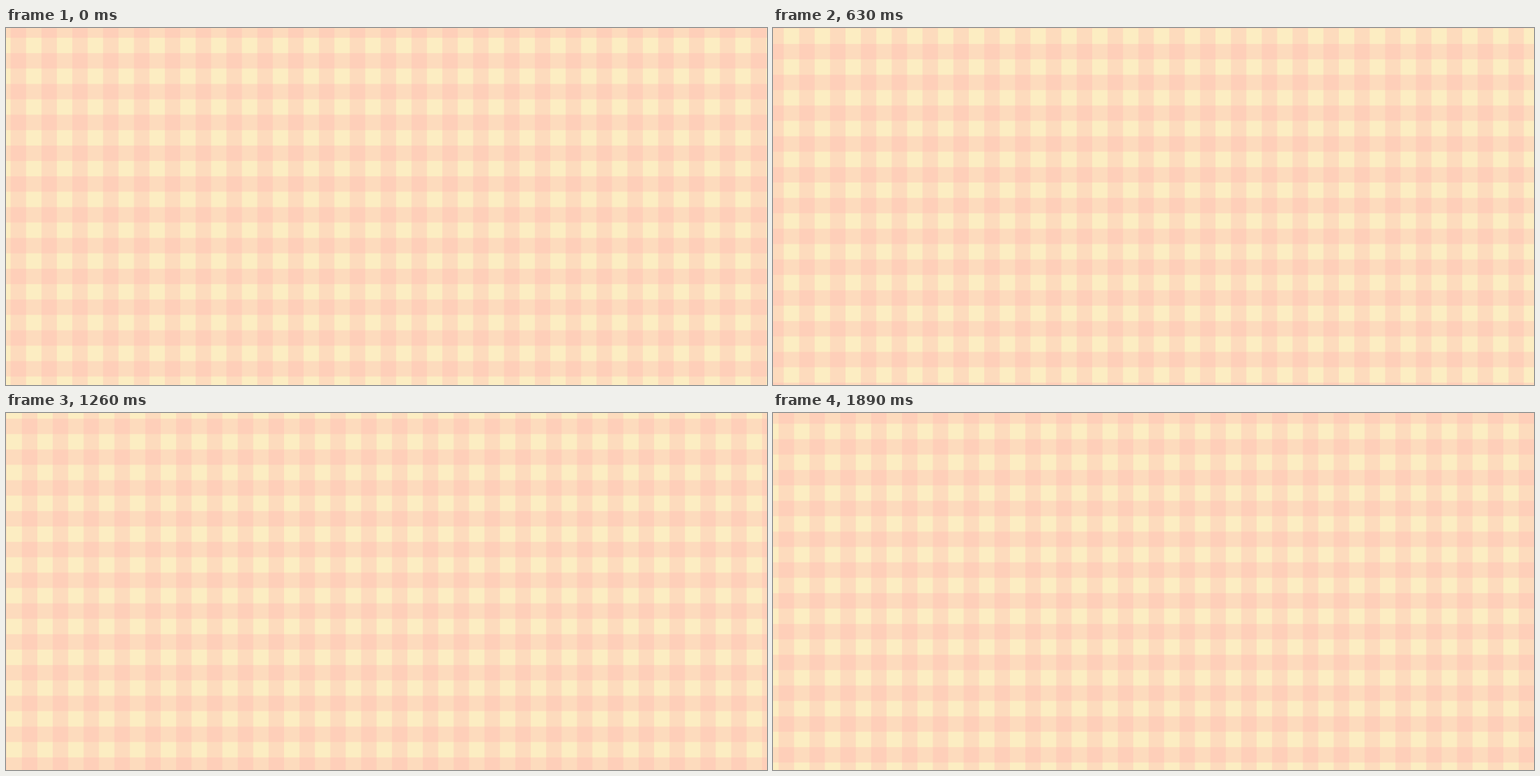
Animation, 1092 px wide and 513 px high, one loop 1.96 s. Source, as an HTML page with a canvas:

```html
<!DOCTYPE html>
<html lang="en">
<head>
<meta charset="utf-8">
<title>Gingham drift</title>
<style>
  html, body { margin: 0; width: 100%; height: 100%; overflow: hidden; background: #fcedc2; }
  canvas { display: block; }
</style>
</head>
<body>
<canvas width="1092" height="513"></canvas>
<script>
const canvas = document.querySelector('canvas');
const ctx = canvas.getContext('2d');
const W = canvas.width, H = canvas.height;
const UNIT = 1.475;        // one scroll step, in pixels
const STRIPE = 15 * UNIT;
const PERIOD = 2 * STRIPE;
const TICK = 70, TICKS = 28;

// Scroll steps done by tick k: one stall, then two skips; 30 steps per loop.
function steps(k) {
  return k - (k === 4) + (k >= 14) + (k >= 23);
}

function draw(k) {
  const shift = steps(k);
  const left = (4.5 - shift) * UNIT;
  const top = (24.5 - shift) * UNIT;
  ctx.fillStyle = '#fcedc2';
  ctx.fillRect(0, 0, W, H);
  ctx.fillStyle = 'rgba(254, 183, 176, 0.333)';
  for (let x = left - PERIOD; x < W; x += PERIOD) ctx.fillRect(x, 0, STRIPE, H);
  for (let y = top - PERIOD; y < H; y += PERIOD) ctx.fillRect(0, y, W, STRIPE);
}

function frame() {
  draw(Math.floor(performance.now() / TICK) % TICKS);
  requestAnimationFrame(frame);
}
frame();
</script>
</body>
</html>
```
